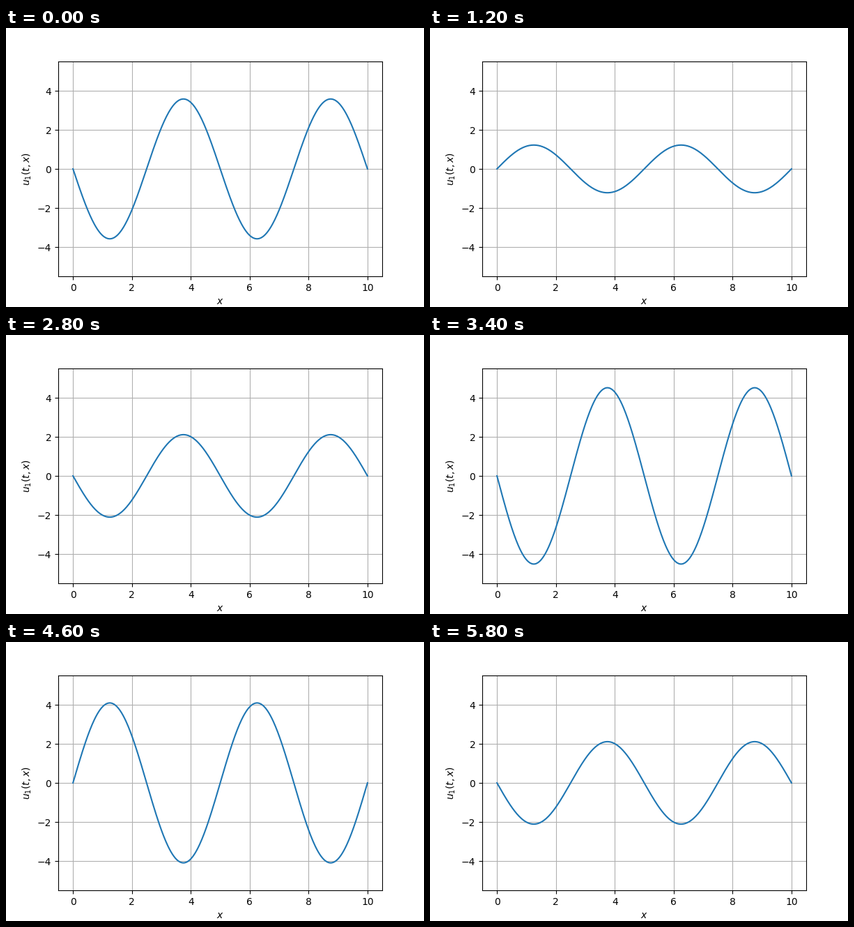
A matplotlib script that plays this animation: 600 by 400 pixels, repeating every 6 s.

```python
import numpy as np
import matplotlib.pyplot as plt
from matplotlib.animation import FuncAnimation

FRAMES = 30
INTERVAL = 200
PERIOD = 15  # frames per oscillation
LENGTH = 10
COS_AMP, SIN_AMP = -3.58, -2.85

x = np.linspace(0, LENGTH, 401)
mode = np.sin(4 * np.pi * x / LENGTH)


def amplitude(frame):
    phase = 2 * np.pi * frame / PERIOD
    return COS_AMP * np.cos(phase) + SIN_AMP * np.sin(phase)


fig, ax = plt.subplots(figsize=(6, 4), dpi=100)
line, = ax.plot(x, amplitude(0) * mode, color="#1f77b4", lw=1.5)
ax.set_xlim(-0.5, 10.5)
ax.set_ylim(-5.5, 5.5)
ax.set_xticks(range(0, 11, 2))
ax.set_yticks(range(-4, 5, 2))
ax.set_xlabel("$x$")
ax.set_ylabel("$u_1(t, x)$")
ax.grid(True)


def update(frame):
    line.set_ydata(amplitude(frame) * mode)
    return line,


anim = FuncAnimation(fig, update, frames=FRAMES, interval=INTERVAL,
                     repeat=True, repeat_delay=0)
plt.show()
```
